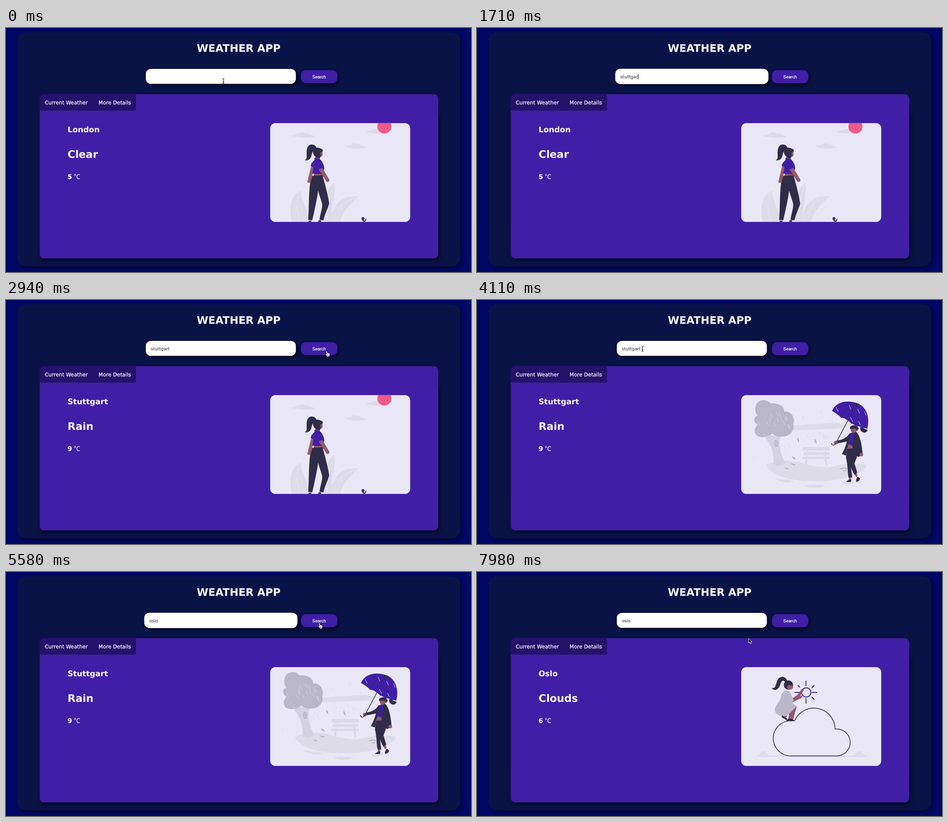
These frames come from a looping animation (1031 by 543 pixels, 8 s). An HTML page:

```html
<!DOCTYPE html>
<html lang="en">
<head>
<meta charset="utf-8">
<title>Weather app</title>
<style>
  html, body { margin: 0; width: 100%; height: 100%; overflow: hidden; background: #000866; }
  svg { display: block; width: 1031px; height: 543px; }
  text { font-family: "DejaVu Sans", Verdana, sans-serif; fill: #fbfaff; white-space: pre; text-rendering: geometricPrecision; }
  .bold { font-weight: bold; }
  .crisp { stroke: #fbfaff; stroke-width: .25px; }
  .shadow { filter: drop-shadow(4px 5px 4px rgba(0, 0, 15, .55)); }
  .dark { fill: #312c48; }
  .skin { fill: #935a6c; }
  .brand { fill: #401fa6; }
  .pale { fill: #dedbe9; }
  .gray { fill: #bab7c8; }
  .line { fill: none; stroke-linecap: round; stroke-linejoin: round; }
</style>
</head>
<body>
<svg viewBox="0 0 1031 543">
  <defs><clipPath id="frame"><rect x="585.8" y="211.7" width="310.4" height="219.9" rx="11.4"/></clipPath></defs>

  <rect class="shadow" x="25.5" y="9.5" width="981.5" height="520.5" rx="18" fill="#0a1345"/>
  <text class="bold" x="423" y="53" font-size="23.1">WEATHER APP</text>

  <g id="field">
    <rect class="shadow" x="310" y="91" width="332.7" height="33.3" rx="11.4" fill="#fff"/>
    <text id="query" x="321" y="111.5" font-size="9.6" style="fill:#222"></text>
    <rect id="caret" y="102" width="1" height="12" fill="#111"/>
  </g>
  <rect class="brand shadow" x="654" y="94" width="80.6" height="28.7" rx="11.4"/>
  <text class="crisp" x="679" y="111.5" font-size="9.6" style="font-family:'Liberation Sans',Arial,sans-serif">Search</text>

  <rect class="brand shadow" x="74.9" y="184" width="883.4" height="328.8" rx="9.5"/>
  <rect class="brand" x="74.9" y="147.5" width="883.4" height="300" rx="9.5"/>
  <path d="M74.900 184V157a9.500 9.500 0 0 1 9.500-9.500H288.300V184Z" fill="#25126b"/>
  <text class="crisp" x="86" y="170.300" font-size="11.52">Current Weather</text>
  <text class="crisp" x="205" y="170.300" font-size="11.52">More Details</text>

  <text id="city" class="bold" x="136.5" y="232.300" font-size="17.16"></text>
  <text id="sky" class="bold" x="136.5" y="289" font-size="23"></text>
  <text id="degrees" class="bold" x="136.5" y="336" font-size="14.3"></text>
  <text x="150.500" y="336" font-size="14.3" style="font-family:'Noto Sans CJK JP','Noto Sans CJK SC','Noto Sans CJK',sans-serif">℃</text>

  <g clip-path="url(#frame)">
    <rect x="585" y="211" width="312" height="221" fill="#e9e7f5"/>

    <g class="scene">
      <g class="pale">
        <path d="M633 240Q644 234 648 236Q656 228 664 235Q668 231 672 236Q681 238 686 243Q655 246 633 240Z"/>
        <path d="M798 231Q807 226 813 227Q820 223 835 225V235Q810 236 798 231Z"/>
        <path d="M749 264Q760 259 764 261Q772 253 779 259Q783 256 787 261Q795 262 798 267Q770 271 749 264Z"/>
        <path d="M654 362C654 382 667 400 674 431H634C627 405 630 372 654 362Z"/>
        <path d="M728 345C716 352 706 370 706 431H724C716 400 733 380 728 345Z"/>
        <path d="M781 375C755 372 736 382 726 405L710 431H741C748 402 767 391 781 375Z"/>
      </g>
      <path class="line" stroke="#eceaf6" stroke-width=".8" d="M650 368C642 390 645 410 652 431M726 350C713 380 714 400 712 431M776 377C747 386 735 403 724 431M641 392l4 10M713 380l5 8M745 391l-2 12"/>
      <circle cx="839" cy="219.200" r="15.7" fill="#ee5b8a"/>
      <path class="skin" d="M687 281H695L694 294L685 291ZM677 306L683 311L676 341L670 342L670 334ZM683 322H702V329H682Z"/>
      <ellipse class="skin" cx="697.5" cy="280" rx="4.5" ry="7"/>
      <circle class="skin" cx="672" cy="341" r="3.800"/>
      <path class="dark" d="M662 294C670 292 665 281 667 271C669 260 676 258 682 260C687 262 690 266 686 270C680 270 679 277 677 285C675 292 670 296 662 294Z"/>
      <path class="dark" d="M680 273C683 265 693 265 697 268.500C702 268 704 273 701 276L697 277L698 283L695.500 291C688 289 680 284 680 273Z"/>
      <path class="brand" d="M684 289L695 291C702 297 706 306 705.500 313L701 325L679 324L682 310L675.500 307C677 300 681 296 684 294Z"/>
      <path class="skin" d="M693 315L701 311L716 336L711 342Z"/>
      <circle class="skin" cx="713" cy="338.500" r="4"/>
      <path class="dark" d="M679 329L702 327.500C706 345 713 365 716.500 391C713 403 706 416 704 428L695 427C697 412 702 400 701 391L692 362C690 380 683 410 679 428L670 427C672 400 671 370 674 347ZM671 429h6v3h-6ZM693 428h6l-1 4h-6Z"/>
      <path class="dark" d="M793 431C789 428 790 426 789 425Q793 426 794 429Q797 427 799 423Q799 429 796 431Z"/>
      <circle class="brand" cx="791.5" cy="424" r="3.200"/>
    </g>

    <g class="scene">
      <g class="pale">
        <path d="M697 283C720 274 752 278 765 275C790 272 822 275 823 279C818 287 780 287 760 288C730 290 705 290 697 288Z"/>
        <path d="M640 367C668 355 695 357 715 361C750 373 778 375 800 368C830 362 850 363 865 367C853 392 800 404 745 403C690 402 655 393 640 367Z"/>
        <path d="M660 395C670 400 690 398 703 404C690 408 667 407 660 395ZM726 412Q745 409 770 412Q763 419 745 418Q732 418 726 412ZM808 405Q820 400 838 404Q828 412 815 412Z"/>
      </g>
      <path d="M722 327h60v8h-60ZM724 338h57v7h-57ZM721 349h61v5h-61ZM728 354h5l-2 14h-4ZM770 354h5l2 14h-4ZM730 327h3v22h-3ZM771 327h3v22h-3Z" fill="#dcd9e8"/>
      <path d="M628 294L654 301L676 302C664 316 674 346 684 363Q671 372 656 366C661 340 650 316 628 294Z" fill="#d4d1e0"/>
      <ellipse class="gray" cx="663" cy="319" rx="4.500" ry="8.500"/>
      <path class="line" stroke="#e2e0ec" d="M660 318l5 -3m-4 8l5 -3"/>
      <path class="gray" d="M617 244C616 221 641 217 651 230C668 228 683 238 681 248C698 247 706 263 701 276C706 290 693 304 677 304C668 304 660 303 655 297C642 309 617 308 616 293C615 284 620 281 622 278C611 271 613 260 622 257Q617 252 617 244Z"/>
      <g id="rain" class="line" stroke="#d9d6e5"></g>
      <path class="gray" d="M710 306q6 4 4 11q-5-4-4-11ZM748 309q6 4 5 11q-6-4-5-11ZM698 347q8 3 9 8q-7 1-9-8ZM695 363l12 3q-6 6-12-3ZM682 373l9 1q-4 6-9-1ZM803 376l10-4q0 6-10 4ZM812 373l9 1q-3 6-9-1ZM809 379l11 0q-5 5-11 0Z"/>

      <path class="skin" d="M840 384L844 390L841 395L837 388ZM824 392H829V400H825Z"/>
      <path class="dark" d="M820 329L843 331C846 345 839 357 837 364C840 374 842 380 843 385L837 389C833 383 831 377 829 372L832 395L824 395C821 381 823 372 818 350Z"/>
      <path class="dark" d="M825 398L830 400L829 405H818.500Q820 402 825 400ZM844 393L849 397Q850 402 841 405L840 401Z"/>
      <path class="dark" d="M826 297L840 293C849 300 853 320 855 343L850 346C846 353 840 346 836 340L831 332L820 330L818 346L809 343C814 334 819 322 820 315L799 319L798 313C812 311 820 306 826 297Z"/>
      <path class="brand" d="M829 296L836 294L837 303L830 326L823 321Z"/>
      <path class="skin" d="M824 321L832 324L833 330L820 331Z"/>
      <ellipse class="skin" cx="835" cy="289" rx="6.500" ry="6.500"/>
      <circle class="skin" cx="795.500" cy="317.500" r="4"/>
      <circle class="skin" cx="852" cy="344" r="4"/>
      <path class="dark" d="M827 287C825 276 846 276 846 287L842 292L840 286ZM849 284C853 281 856 286 866 289C864 297 854 297 850 289Z"/>
      <path class="line" stroke="#312c48" stroke-width="1.6" d="M824 265L795 320C791 325 786 323 786 319"/>
      <path class="brand" d="M787 247C795 227 820 221 844 230C867 240 871 266 865 287C859 283 853 286 848 281C840 282 836 276 830 275C823 268 815 262 807 262C803 257 795 251 787 247Z"/>
      <path class="line" stroke="#31206f" d="M841 232Q814 239 807 262M841 232Q824 250 830 275M841 232Q845 258 848 281"/>
      <path class="dark" d="M837 229L848 231L846 238L839 235Z"/>
      <path class="line" stroke="#dcd8ef" d="M796 239l5 9m24-14l4 9m15 0l4 9m11-4l4 9m-35 4l5 10m13-1l4 8"/>
    </g>

    <g class="scene">
      <g class="pale">
        <path id="bush" d="M624 408q2-6 6-4q0-6 5-5q5 0 5 5q5-1 6 4Z"/>
        <use href="#bush" x="213"/>
      </g>
      <path class="line" stroke="#c6c3d5" d="M620 409.800H862"/>
      <path class="line" stroke="#3b3556" stroke-width="1.700" d="M696 409.300A39 39 0 0 1 696 331Q700 330.500 704 331A47 47 0 0 1 794 349.500A30 30 0 1 1 797 409.300Z"/>
      <g class="line" stroke="#401fa6" stroke-width="1.900">
        <circle cx="730" cy="268" r="10.200"/>
        <path stroke-linecap="butt" d="M729.500 242v12m0 27v12M704 268h12m26 0h12M711 252l5 5m32-5l-6 6m0 20l6 6"/>
      </g>
      <path class="skin" d="M697 283L711 273L720 260L725 262L716 277L700 291ZM709 299L701 328L690 329L693 308Z"/>
      <path class="skin" d="M698 282L716 276L723 274L718 281L700 289ZM681 315L692 313L684 325L679 322Z"/>
      <path class="gray" d="M684 264C692 263 697 269 697 275L703 286L698 290C700 295 708 295 708 300C700 305 697 314 686 320C672 324 657 315 661 302C664 294 672 289 674 277C676 269 679 265 684 264Z"/>
      <path class="dark" d="M653 258C664 260 662 249 666 241C671 231 683 230 688 242L684 246C677 236 674 246 671 254C667 263 658 265 653 258Z"/>
      <circle class="dark" cx="690.500" cy="251.500" r="10.200"/>
      <ellipse class="skin" cx="694" cy="256.500" rx="6.800" ry="5.300"/>
      <path class="dark" d="M677 319Q684 325 688 326L687 331Q682 326 675 323ZM690 326Q698 326 703 330V332H686Z"/>
    </g>
  </g>

  <g class="pointer"><path class="line" stroke="#222" stroke-width="1.200" d="M-2-5.500Q0-5.500 0-4V4Q0 5.500-2 5.500M2-5.500Q0-5.500 0-4M0 4Q0 5.500 2 5.500M-1.500 2H1.500"/></g>
  <g class="pointer"><path d="M-4-6Q-2-7-1-5L0-2Q5-2 5 1L4 5V6H-1Q-2 3-5 1Q-5-1-2 0Z" fill="#fff" stroke="#150b3c" stroke-width=".8"/><path class="line" stroke="#2b1a60" stroke-width=".7" d="M0 2v2m1.700-2v2"/></g>
  <g class="pointer"><path d="M0 0V10L2.500 8L4.500 12L6.500 11L4.700 7.300H8Z" fill="#000" stroke="#fff" stroke-width=".9"/></g>
</svg>
<script>
const LOOP = 8000;
const byId = id => document.getElementById(id);
const scenes = document.querySelectorAll('.scene');
const pointers = document.querySelectorAll('.pointer');
const field = byId('field'), query = byId('query'), caret = byId('caret');

// Pointer stops: time, x, y
const path = [
  [0, 482, 118], [1920, 482, 118], [2370, 713, 120], [3060, 713, 120],
  [3450, 540, 184], [3720, 397, 119], [3900, 397, 119], [4080, 367, 109],
  [5190, 367, 109], [5550, 697, 120], [5880, 697, 120], [5970, 699, 118],
  [7200, 699, 118], [7260, 700, 118], [7890, 700, 118], [7980, 602, 148]
];
const reports = [[0, 'London', 'Clear', 5], [2910, 'Stuttgart', 'Rain', 9], [7500, 'Oslo', 'Clouds', 6]];
const pictures = [[0, 0], [3000, 1], [7530, 2]];

// Every state of the search field with its time
const edits = [[0, '']];
const type = (word, start, gap) => [...word].forEach((_, i) => edits.push([start + i * gap, word.slice(0, i + 1)]));
edits.push([480, '']);
type('stuttgar', 1290, 60);
edits.push([1860, 'stuttgart'], [4120, 'stuttgart']);
for (let n = 8; n >= 0; n--) edits.push([4350 + (8 - n) * 40, 'stuttgart'.slice(0, n)]);
type('oslo', 4710, 100);

const clamp = v => Math.min(1, Math.max(0, v));
const latest = (list, t) => list.filter(item => item[0] <= t).pop();
const ease = (t, start, length = 500) => 1 - (1 - clamp((t - start) / length)) ** 2.6;
const between = (v, a, b) => v > a && v < b;

function makeRain() {
  let seed = 7;
  const random = () => (seed = seed * 16807 % 2147483647) / 2147483647;
  const drops = (count, x, y, width, height) => Array.from({ length: count },
    () => `M${x + random() * width} ${y + random() * height}l4 9`).join('');
  byId('rain').innerHTML = `<path d="${drops(28, 610, 238, 215, 115)}"/>
    <path d="${drops(10, 626, 238, 62, 50)}" stroke="#dcd9e7"/>`;
}

function pointerAt(t) {
  const next = path.findIndex(stop => stop[0] > t);
  if (next < 0) return path[path.length - 1].slice(1);
  const [t0, x0, y0] = path[next - 1], [t1, x1, y1] = path[next];
  const p = (t - t0) / (t1 - t0), k = p * p * (3 - 2 * p);
  return [x0 + (x1 - x0) * k, y0 + (y1 - y0) * k];
}

function draw(t) {
  const focus = ease(t, 480) - ease(t, 2400) + ease(t, 4120) - ease(t, 5640);
  field.setAttribute('transform', `translate(476.4 107.7) scale(${1 + .021 * focus}) translate(-476.4 -107.7)`);

  const [editTime, value] = latest(edits, t);
  query.textContent = value;
  const focused = between(t, 480, 2400) || between(t, 4120, 5640);
  caret.style.display = focused && (t - editTime) % 1000 < 500 ? '' : 'none';
  caret.setAttribute('x', 321 + (value ? query.getComputedTextLength() : 0));

  const [, city, sky, degrees] = latest(reports, t);
  byId('city').textContent = city;
  byId('sky').textContent = sky;
  byId('degrees').textContent = degrees;
  const picture = latest(pictures, t)[1];
  scenes.forEach((scene, i) => scene.style.display = i === picture ? '' : 'none');

  const [x, y] = pointerAt(t);
  const typing = between(t, 1289, 1920) || between(t, 4349, 5190);
  const kind = between(x, 310, 643) && between(y, 91, 124) ? 0
    : between(x, 654, 735) && between(y, 94, 123) ? 1 : 2;
  pointers.forEach((pointer, i) => {
    pointer.style.display = i === kind && !typing ? '' : 'none';
    pointer.setAttribute('transform', `translate(${x} ${y})`);
  });
}

makeRain();
const start = performance.now();
(function tick() {
  draw((performance.now() - start) % LOOP);
  requestAnimationFrame(tick);
})();
</script>
</body>
</html>
```
